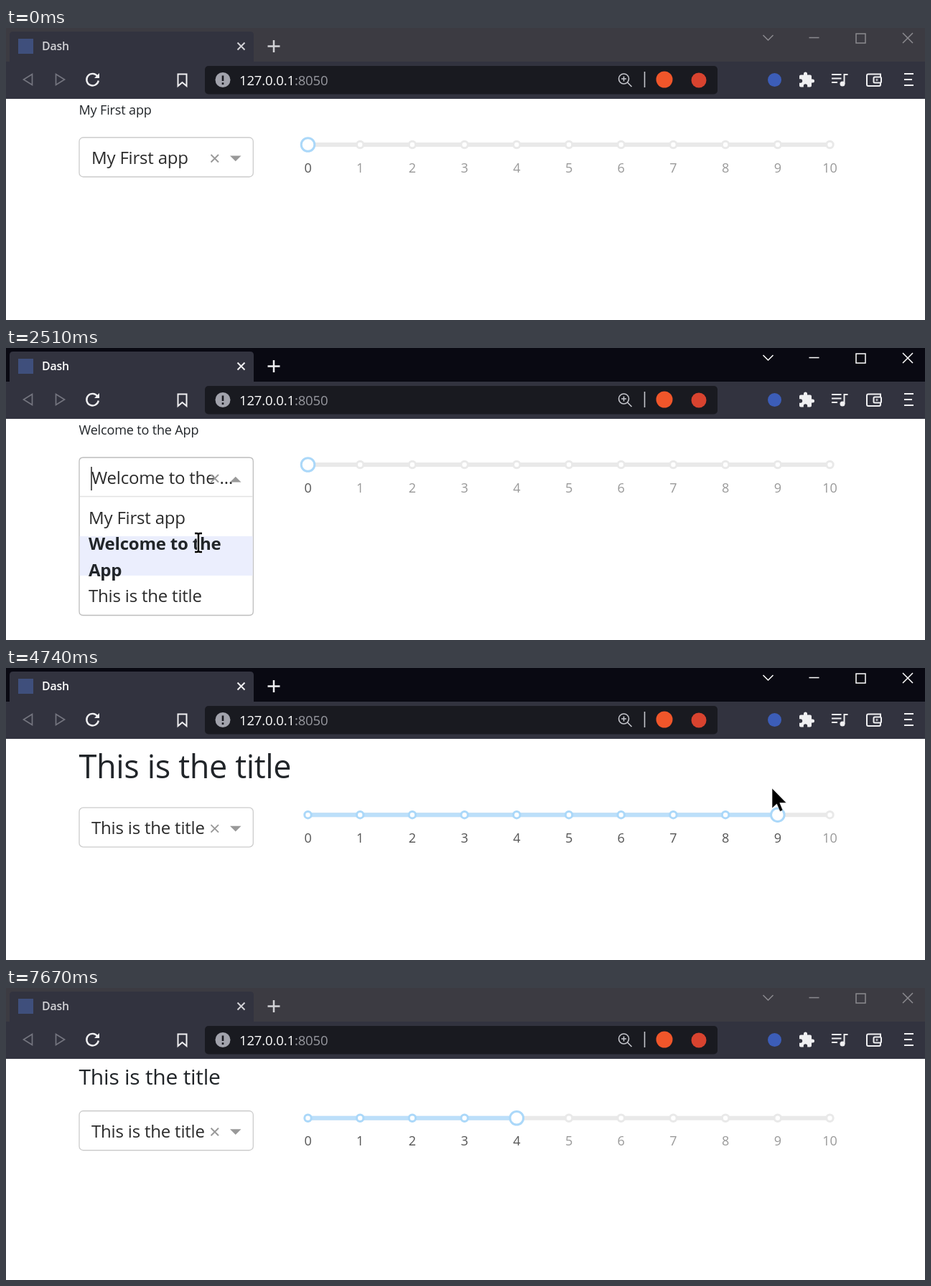
An HTML page for the animation above (7.73 s loop, 1280 by 408 pixels).

```html
<!DOCTYPE html>
<html lang="en">
<head>
<meta charset="utf-8">
<title>Dash</title>
<style>
  html, body { margin: 0; width: 100%; height: 100%; overflow: hidden; background: #fff; }
  svg { display: block; width: 100vw; height: 100vh; }
  text { font-family: "Open Sans", "Noto Sans", sans-serif; letter-spacing: -.008em; white-space: pre; fill: #212529; }
  .line { fill: none; stroke: #f0f0f2; stroke-width: 2; }
  .field text { font-size: 24px; fill: #2b2b2b; }
  .menu .chosen { font-weight: 700; fill: #212529; }
  .mark { font-size: 18px; text-anchor: middle; fill: #999; }
  .mark.on { fill: #555; }
  .dot { fill: #fff; stroke: #e9e9e9; stroke-width: 3; }
  .dot.on { stroke: #abd8f9; }
  .knob { fill: #fff; stroke: #abd8f9; stroke-width: 3; }
  .knob.hover { stroke: #7cc0f3; }
  .knob.drag { stroke: #78bdf2; filter: drop-shadow(0 0 3px #57b5f7); }
  .bar { fill: #090912; }
  .tab { font-size: 15.8px; font-weight: 600; fill: #fff; }
  .controls { fill: none; stroke: #fff; stroke-width: 1.5; }
  .idle .bar { fill: #3c3b42; }
  .idle .tab { fill: #d2d2d6; }
  .idle .controls { stroke: #8b8a8f; }
  .idle .tabicon { stroke: #d2d2d6; }
  .press { fill: #fff95c; mix-blend-mode: multiply; }
</style>
</head>
<body>
<svg viewBox="0 0 1280 408">
  <rect width="1280" height="408" fill="#fff"/>

  <g id="chrome">
    <rect class="bar" width="1280" height="48"/>
    <path d="M5 48V10q0-5 5-5H340q5 0 5 5V48Z" fill="#32333f"/>
    <rect y="47" width="1280" height="52" fill="#32333f"/>
    <rect x="17" y="15" width="21" height="21" fill="#3f4f7c"/>
    <text class="tab" x="50" y="31">Dash</text>
    <g class="line tabicon">
      <path d="M322.500 20.500l10 10m0-10l-10 10"/>
      <path d="M364.500 25.500h17m-8.500-8.500v17" stroke-width="2.500"/>
    </g>
    <g class="controls">
      <path d="M1054.500 10l7 7 7-7M1118.500 13.500h14M1249 7l14 14m0-14l-14 14"/>
      <rect x="1184" y="8" width="13" height="13"/>
    </g>

    <g class="line">
      <path d="M36.500 64.500v15l-12-7.500ZM69.500 64.500v15l12-7.500Z" stroke="#74757f" stroke-width="1.700"/>
      <path d="M127.500 67.500a8.300 8.300 0 1 0 1.300 6" stroke-width="2.400"/>
      <path d="M130 63v7h-7Z" fill="#f0f0f2" stroke="none"/>
      <path d="M239.500 64.500h12v16.500l-6-5-6 5Z"/>
    </g>
    <rect x="277" y="53" width="714" height="39.500" rx="5" fill="#191a20"/>
    <circle cx="302" cy="72.500" r="10.500" fill="#a2a3ac"/>
    <path d="M302 66.500v7.500m0 2.300v2.700" stroke="#191a20" stroke-width="2.600"/>
    <text x="325" y="79.500" font-size="18.500" style="fill:#fff">127.0.0.1<tspan fill="#97989f">:8050</tspan></text>
    <g class="line" stroke-width="1.500" style="stroke:#c4c5cb;stroke-width:1.600">
      <circle cx="860.500" cy="71" r="7"/>
      <path d="M865.500 76l6 6M857 71h7m-3.500-3.500v7M889.500 61v22"/>
    </g>
    <circle cx="917" cy="72" r="11.500" fill="#f0562a"/>
    <circle cx="965" cy="73" r="10.500" fill="#d8432f"/>
    <circle cx="1070.500" cy="72.500" r="9.500" fill="#3c5db8"/>
    <path transform="translate(1103 60.500)" fill="#f0f0f2" d="M20.500 11H19V7c0-1.100-.9-2-2-2h-4V3.500a2.500 2.500 0 0 0-5 0V5H4c-1.100 0-2 .9-2 2v3.800h1.500a2.700 2.700 0 0 1 0 5.400H2V20c0 1.100.9 2 2 2h3.800v-1.500a2.700 2.700 0 0 1 5.400 0V22H17c1.100 0 2-.9 2-2v-4h1.500a2.500 2.500 0 0 0 0-5z"/>
    <g class="line">
      <path d="M1150 65h13.500M1150 70.500h13.500M1150 76h8M1167.500 78V65h5"/>
      <circle cx="1165" cy="78" r="2.500" fill="#f0f0f2"/>
      <path d="M1218 68v-3.500h-17q-2 0-2 2v12.500q0 2 2 2h15q2 0 2-2v-2.500"/>
      <rect x="1208.500" y="68.500" width="10.500" height="8" rx="1.500"/>
      <circle cx="1213" cy="72.500" r="1" stroke-width="1"/>
      <path d="M1251 64h13M1251 72h11M1251 80h13"/>
    </g>
  </g>

  <text id="title" x="101.500"></text>

  <g id="body">
    <g id="slider">
      <path d="M420.500 163H1147.500" stroke="#e9e9e9" stroke-width="6" stroke-linecap="round"/>
      <path id="track" stroke="#bcdffa" stroke-width="6"/>
      <g id="marks"></g>
      <circle id="knob" cy="163" r="9.300"/>
    </g>
    <g class="field">
      <rect id="frame" x="102" y="153" width="242.300" height="55" rx="5.500" fill="#fff" stroke="#ccc" stroke-width="1.300"/>
      <g id="menu" class="menu">
        <path d="M102 207V158.500q0-5.500 5.500-5.500H338.800q5.500 0 5.500 5.500V368q0 5.500-5.500 5.500H107.500q-5.500 0-5.500-5.500Z" fill="#fff" stroke="#bdbdbd" stroke-width="1.300"/>
        <path d="M103 207.500H343.500" stroke="#e2e2e2" stroke-width="1.300"/>
        <rect id="focus" x="102.700" width="241" height="55" fill="#ebeefd"/>
        <text x="115" y="246">My First app</text>
        <text x="115" y="281.500">Welcome to the<tspan x="115" dy="37.500">App</tspan></text>
        <text x="115" y="355">This is the title</text>
      </g>
      <text id="value" x="119" y="190"></text>
      <path id="caret" d="M119 166v33" stroke="#222" stroke-width="1.500"/>
      <path d="M285.500 177l10.500 10.500m0-10.500l-10.500 10.500" stroke="#999" stroke-width="1.900"/>
      <path id="toggle" fill="#999"/>
    </g>
  </g>

  <g id="cursor">
    <path id="arrow" d="M0 0V28L6.500 22 11 32.500 15 30.700 10.800 20.500H20Z" fill="#000" stroke="#fff" stroke-width=".6"/>
    <g id="beam" fill="none">
      <path d="M-5-13h3q2 0 2 2v22q0 2-2 2h-3M5-13h-3q-2 0-2 2v22q0 2 2 2h3" stroke="#fff" stroke-width="4"/>
      <path d="M-5-13h3q2 0 2 2v22q0 2-2 2h-3M5-13h-3q-2 0-2 2v22q0 2 2 2h3" stroke="#000" stroke-width="2.400"/>
    </g>
    <path id="hand" fill="#fff" stroke="#111" stroke-width="1.300" stroke-linejoin="round" d="M-3 10L-4 7C-6 4-10 1-9.500-1C-9-2.500-7-2-5 1L-7-5C-8-8-5.200-8.800-4.300-6L-3-2V-7.500C-3-10.500 0-10.500 .2-7.500L.5-2 1.800-7.500C2.500-10 5.200-9.300 4.800-6.800L4-1 6-4.500C7.200-6.800 9.800-5.500 9-3.200C8 0 7.500 3 7 5L5.500 7.500V10Z"/>
  </g>
  <circle id="press" class="press" r="17"/>
</svg>

<script>
const LOOP = 7730, TICK = 68;
const LEFT = 420.5, STEP = 72.7;
const titles = ["My First app", "Welcome to the App", "This is the title"];
const values = ["My First app", "Welcome to the …", "This is the title"];

// time, x, y, pointer shape from then on
const path = [
  [120, 669, 309, "arrow"], [800, 281, 178, "arrow"], [1010, 281, 178, "arrow"],
  [1550, 275, 256, "arrow"], [1830, 275, 256, "arrow"], [2010, 310, 190, "arrow"],
  [2390, 310, 190, "beam"], [2510, 268, 272, "beam"], [2580, 264, 292, "arrow"],
  [2780, 258, 342, "arrow"], [3060, 258, 342, "arrow"], [3580, 420, 163, "hand"],
  [3780, 420, 163, "hand"], [4050, 828, 163, "hand"], [4450, 1073, 163, "hand"],
  [4660, 1073, 163, "arrow"], [4661, 1067, 168, "arrow"], [5429, 1067, 168, "arrow"],
  [5430, 1096, 224, "arrow"], [5630, 1096, 224, "arrow"], [5770, 1079, 208, "hand"],
  [6040, 1079, 208, "hand"], [6390, 701, 242, "hand"], [6450, 694, 243, "hand"],
  [6969, 694, 243, "hand"], [6970, 706, 238, "arrow"], [7340, 1154, 376, "arrow"],
  [7400, 1154, 376, ""]
];
const presses = [[940, 1010], [1690, 1755], [2320, 2390], [2920, 2990], [3780, 4590], [6040, 6450]];
const opened = [[1010, 1830], [2390, 3060]];

const $ = id => document.getElementById(id);
const set = (el, attrs) => { for (const k in attrs) el.setAttribute(k, attrs[k]); };
const show = (el, on) => { el.style.display = on ? "" : "none"; };
const within = (list, t) => list.find(([a, b]) => t >= a && t < b);
const options = document.querySelectorAll("#menu > text");

const marks = Array.from({ length: 11 }, (_, i) => {
  const add = tag => $("marks").appendChild(document.createElementNS("http://www.w3.org/2000/svg", tag));
  const dot = add("circle"), label = add("text"), x = LEFT + i * STEP;
  set(dot, { cx: x, cy: 163, r: 4.7 });
  set(label, { x, y: 201.7 });
  label.textContent = i;
  return { dot, label };
});

function pointer(t) {
  const i = path.findLastIndex(k => k[0] <= t);
  if (i < 0) return { x: 0, y: 0, shape: "" };
  const [t0, x, y, shape] = path[i];
  const [t1, x1, y1] = path[i + 1] || [LOOP, x, y];
  const p = Math.floor((t - t0) / TICK) * TICK / (t1 - t0);
  return { x: x + (x1 - x) * p, y: y + (y1 - y) * p, shape };
}

function sliderValue(t, x) {
  if (t < 3780) return 0;
  if (t >= 6450) return 4;
  if (t >= 4590 && t < 6040) return 9;
  return Math.max(0, Math.min(9, Math.round((x - 10 - LEFT) / STEP)));
}

function drawSlider(t, { x, shape }, pressed) {
  const v = sliderValue(t, x), kx = LEFT + v * STEP;
  set($("track"), { d: `M${LEFT} 163H${kx}` });
  marks.forEach(({ dot, label }, i) => {
    set(dot, { class: i <= v && v > 0 ? "dot on" : "dot" });
    set(label, { class: i <= v ? "mark on" : "mark" });
  });
  const state = shape !== "hand" || t >= 6450 ? "" : pressed ? "drag" : "hover";
  set($("knob"), { cx: kx, class: "knob " + state });
}

function drawField(t, y, choice) {
  const open = within(opened, t);
  show($("menu"), open);
  show($("frame"), !open);
  show($("caret"), open && (t - open[0]) % 1060 < 530);
  const hovered = y < 207 ? choice : Math.min(2, Math.floor((y + 10 - 208) / 55));
  set($("focus"), { y: 208 + 55 * hovered });
  options.forEach((el, i) => set(el, { class: i === choice ? "chosen" : "" }));
  $("value").textContent = values[choice];
  set($("toggle"), { d: open ? "M312 187.500h15.500l-7.750-7.700Z" : "M312 178.500h15.500l-7.750 7.700Z" });
}

function render(now) {
  const t = now % LOOP;
  const p = pointer(t), pressed = within(presses, t);
  const choice = t < 1830 ? 0 : t < 3060 ? 1 : 2;
  const applied = t < 4660 ? 0 : t < 6660 ? 9 : 4;
  const size = 18.75 + 3.125 * applied;

  set($("chrome"), { class: t < 940 || t >= 7670 ? "idle" : "" });
  $("title").textContent = titles[choice];
  set($("title"), { y: 99 + size * 1.164, "font-size": size * .96 });
  set($("body"), { transform: `translate(0 ${4.6875 * applied})` });
  drawSlider(t, p, pressed);
  drawField(t, p.y, choice);

  set($("cursor"), { transform: `translate(${p.x} ${p.y})` });
  for (const s of ["arrow", "beam", "hand"]) show($(s), p.shape === s);
  set($("press"), { cx: p.x, cy: p.y });
  show($("press"), pressed);
}

const start = performance.now();
function loop() {
  render(performance.now() - start);
  requestAnimationFrame(loop);
}
loop();
</script>
</body>
</html>
```
